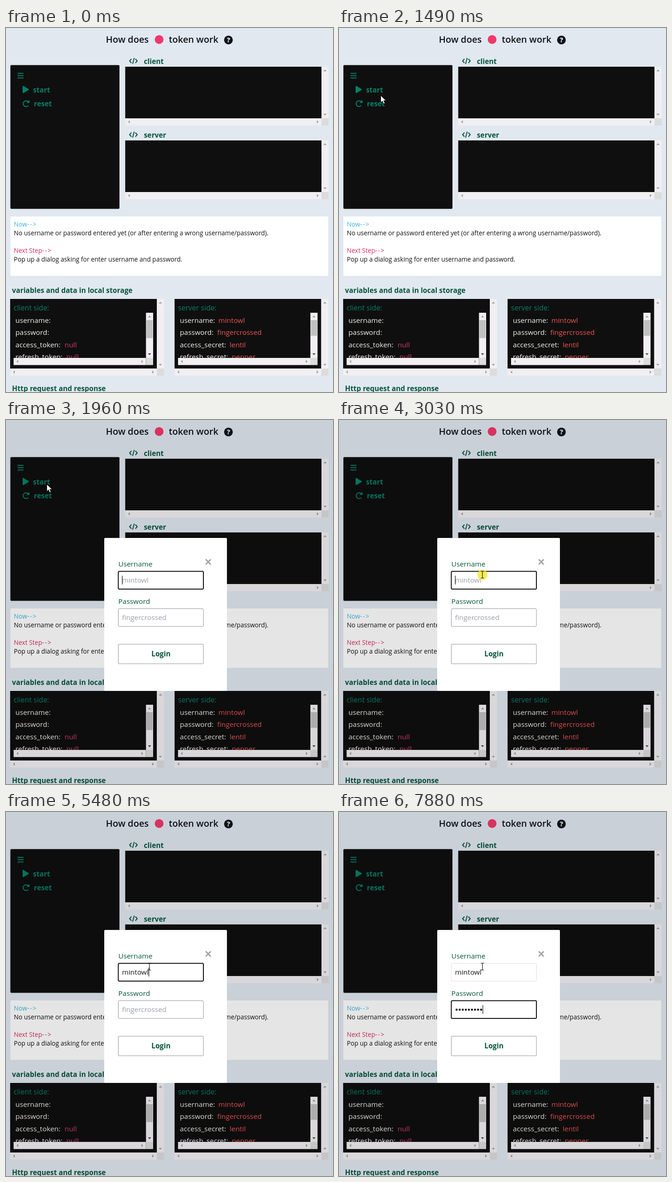
Recreate the animation shown at these times as an HTML page. Size 709 by 790 pixels, loop 8 s.

```html
<!DOCTYPE html>
<html lang="en">
<head>
<meta charset="utf-8">
<title>How does token work</title>
<style>
  html, body { margin: 0; width: 100%; height: 100%; overflow: hidden; background: #e1e8f0; }
  svg { display: block; width: 100%; height: 100%; }
  text { font: 15.3px "Open Sans", "Noto Sans", sans-serif; white-space: pre; }
  .bold { font-weight: 700; fill: #07553c; }
  .title { font-size: 19.7px; font-weight: 600; fill: #101218; }
  .note { font-size: 13.6px; fill: #111; }
  .arrow { letter-spacing: 1.6px; }
  .menu { fill: #058068; }
  .line { fill: none; stroke-width: 2; }
  .dark { fill: #0f0f0f; }
  .track { fill: #f1eff1; }
  .corner { fill: #dcdcdc; }
  .row { fill: #f4f1ea; }
  .label { fill: #05553d; }
  .hint { fill: #9b9fa6; }
  .typed { fill: #161616; }
  .box { fill: #fff; stroke: #8f939c; }
  .box.done { stroke: #dedede; }
  .box.focus { stroke: #111; stroke-width: 2; }
</style>
</head>
<body>
<svg viewBox="0 0 709 790">
  <text class="title" x="216.5" y="32">How does</text>
  <circle cx="332" cy="25" r="9.5" fill="#f0386b"/>
  <text class="title" x="353" y="32">token work</text>
  <circle cx="482.3" cy="26" r="9.4" fill="#101218"/>
  <text x="482.3" y="31.3" text-anchor="middle" style="font-size:14.5px;font-weight:800" fill="#e1e8f0">?</text>

  <rect class="dark" x="9.5" y="80.5" width="236.5" height="312" rx="2"/>
  <rect id="hover" x="32" y="122" width="66" height="23" fill="#f0f4f1"/>
  <path class="line" stroke="#058068" d="M25 98.5h13M25 103.5h13M25 108.5h13"/>
  <path class="menu" d="M36 127q0-2 2-1l11 6.500q1.500 1 0 2l-11 6.500q-2 1-2-1z"/>
  <text class="bold menu" x="58.500" y="139.500" style="fill:#058068">start</text>
  <path class="line" stroke="#058068" d="M48.800 160.800A6.300 6.300 0 1 0 48.300 168.300"/>
  <path class="menu" d="M51 156v6.500h-6.500z"/>
  <text class="bold" x="60.500" y="169.500" style="fill:#058068">reset</text>

  <g id="page"></g>

  <rect x="9.500" y="409" width="689" height="129" fill="#fff"/>
  <text class="note" x="17" y="431" style="fill:#3cb4e0">Now<tspan class="arrow">--&gt;</tspan></text>
  <text class="note" x="17" y="450">No username or password entered yet (or after entering a wrong username/password).</text>
  <text class="note" x="17" y="488" style="fill:#d62c5c">Next Step<tspan class="arrow">--&gt;</tspan></text>
  <text class="note" x="17" y="507">Pop up a dialog asking for enter username and password.</text>
  <text class="bold" x="13" y="575">variables and data in local storage</text>
  <text class="bold" x="13" y="787.500">Http request and response</text>

  <g id="dialog">
    <rect width="709" height="790" opacity=".1"/>
    <rect x="213" y="256" width="266" height="332" rx="2" fill="#fff"/>
    <path d="M433 302.500l11 11m0-11l-11 11" stroke="#a2a2a2" stroke-width="3"/>
    <text class="label" x="243.500" y="318">Username</text>
    <rect id="userBox" class="box" x="243.500" y="328.500" width="184.500" height="38.500" rx="2"/>
    <text id="user" x="251.500" y="353"></text>
    <text class="label" x="243.500" y="399">Password</text>
    <rect id="passBox" class="box" x="243.500" y="409.500" width="184.500" height="38.500" rx="2"/>
    <text id="passHint" class="hint" x="251.500" y="434">fingercrossed</text>
    <g id="dots"></g>
    <rect id="caret" width="1.200" height="19" fill="#111"/>
    <rect class="box" x="243.500" y="486.500" width="184.500" height="42.500" rx="1"/>
    <text class="bold" x="336" y="513" text-anchor="middle">Login</text>
  </g>

  <g id="cursor">
    <circle id="press" r="11" cy=".5" fill="#f2e72c" opacity=".78"/>
    <path id="point" d="M.5.5V16l3.700-3.500 2.600 6 2.700-1.200-2.600-5.800h5z" fill="#fff" stroke="#111"/>
    <path id="hand" d="M-1.500 1q1.500-2 3 0v6q2-1 3 .5 2-.5 3 1 2-.3 2 2v5l-2 3.500v2h-8v-2l-5.500-7q-.5-2 1.500-2l3 2.500z" fill="#fff" stroke="#222" stroke-width=".7"/>
    <path id="beam" d="M-3.500-7.500h2.500l1 1 1-1h2.500M-3.500 7.500h2.500l1-1 1 1h2.500M0-6.500v13" fill="none" stroke="#111" stroke-width="1.200"/>
  </g>
</svg>
<script>
const $ = id => document.getElementById(id);
const LOOP = 8000, NAME = 'mintowl';

const rect = (cls, x, y, w, h) => `<rect class="${cls}" x="${x}" y="${y}" width="${w}" height="${h}"/>`;
const text = (cls, x, y, s) => `<text class="${cls}" x="${x}" y="${y}">${s}</text>`;
const tip = (x, y, turn, fill = '#a3a3a3') =>
  `<path d="M-3.5 2h7l-3.5-4z" fill="${fill}" transform="translate(${x} ${y}) rotate(${turn})"/>`;

// A pane's two scrollbars, below and to the right of its content
function bars(x, y, w, h, size = 15.5, down) {
  const r = x + w, b = y + h, m = size / 2;
  return rect('track', r, y, size, h) + rect('track', x, b, w, size) + rect('corner', r, b, size, size) +
    tip(r + m, y + 8, 0) + tip(r + m, b - 8, 180, down) +
    tip(x + 8, b + m, -90) + tip(r - 8, b + m, 90);
}

const pane = (x, y, w, h) => rect('dark', x, y, w, h) + bars(x, y, w, h);

function code(y, name) {
  return `<path class="line" stroke="#07553c" stroke-width="2.3" d="M272 ${y - 17}l-4 4.5 4 4.500M280.500 ${y - 17}l4 4.500-4 4.500M278 ${y - 19}l-3.500 13"/>` +
    text('bold', 299, y - 6.5, name) + pane(258.5, y, 425.5, 112);
}

function store(x, side, thumb, color, rows) {
  const lines = rows.map(([key, value, at], i) => {
    const y = 639.5 + i * 26.5;
    return text('row', x + 11.5, y, key + ':') +
      `<text x="${x + at}" y="${y}" fill="${color}">${value}</text>`;
  }).join('');
  return pane(x, 588, 318, 151) +
    `<text x="${x + 7.5}" y="612.500" style="font-size:15.6px" fill="#078068">${side} side:</text>` +
    lines + rect('dark', x + 7, 716, 304, 23) +
    bars(x + 7.5, 618, 287, 98, 15.5, '#505050') +
    `<rect x="${x + 295.500}" y="634" width="13.500" height="${thumb}" fill="#c1c1c1"/>`;
}

$('page').innerHTML = code(84, 'client') + code(244, 'server') +
  store(9, 'client', 39, '#d63d70', [
    ['username', '', 0], ['password', '', 0], ['access_token', 'null', 118], ['refresh_token', 'null', 122]]) +
  store(365.5, 'server', 34, '#f05454', [
    ['username', NAME, 95], ['password', 'fingercrossed', 92.5],
    ['access_secret', 'lentil', 119.5], ['refresh_secret', 'pepper', 124]]);

const userKeys = [4220, 4420, 4550, 4820, 5280, 5380, 5480];
const passKeys = [6210, 6350, 6550, 6880, 7080, 7150, 7410, 7680, 7880];
const DOT = 6.65;
$('dots').innerHTML = passKeys.map((k, i) =>
  `<circle cx="${255 + i * DOT}" cy="429" r="2.300" fill="#111"/>`).join('');

// time, x, y of the pointer
const path = [
  [720, 690, 222], [860, 540, 227], [1070, 242, 213], [1210, 165, 184], [1350, 112, 158],
  [1490, 90, 146], [1760, 88, 139], [2212, 88, 139], [2550, 259, 292], [2618, 259, 292], [2955, 311, 335.5]];

function pointer(t) {
  // the pointer is sampled in short, even steps
  const [from, step] = t < 2280 ? [720, 70] : [2280, 67.5];
  const q = from + Math.floor((t - from) / step) * step;
  const i = path.findIndex(p => p[0] > q);
  if (i < 0) return path[path.length - 1].slice(1);
  const a = path[Math.max(i - 1, 0)], b = path[i];
  const k = i ? (q - a[0]) / (b[0] - a[0]) : 0;
  return [a[1] + (b[1] - a[1]) * k, a[2] + (b[2] - a[2]) * k];
}

const show = (id, on) => $(id).style.display = on ? '' : 'none';
const within = (t, a, b) => t >= a && t < b;
const count = (keys, t) => keys.filter(k => k <= t).length;

function draw(t) {
  const open = t >= 1960, onPass = t >= 5880, over = within(t, 1560, 1960);
  show('dialog', open);
  show('hover', over);

  const letters = count(userKeys, t), dots = count(passKeys, t);
  const user = $('user');
  user.textContent = letters ? NAME.slice(0, letters) : NAME;
  user.setAttribute('class', letters ? 'typed' : 'hint');
  $('userBox').setAttribute('class', onPass ? 'box done' : 'box focus');
  $('passBox').setAttribute('class', onPass ? 'box focus' : 'box');
  show('passHint', !dots);
  [...$('dots').children].forEach((d, i) => d.style.display = i < dots ? '' : 'none');

  show('caret', !within(t, 2490, 3020) && !within(t, 3560, 4090));
  const width = onPass ? dots * DOT : letters && open ? user.getComputedTextLength() : 0;
  $('caret').setAttribute('x', 251.5 + width);
  $('caret').setAttribute('y', onPass ? 419 : 338);

  const [x, y] = pointer(t), beam = open && y > 328;
  show('cursor', t >= 720);
  $('cursor').setAttribute('transform', `translate(${x} ${y})`);
  show('press', within(t, 1900, 1960) || within(t, 3020, 3160));
  show('hand', over);
  show('beam', beam);
  show('point', !over && !beam);
}

let start;
function tick(now) {
  start ??= now;
  draw((now - start) % LOOP);
  requestAnimationFrame(tick);
}
draw(0);
requestAnimationFrame(tick);
</script>
</body>
</html>
```
